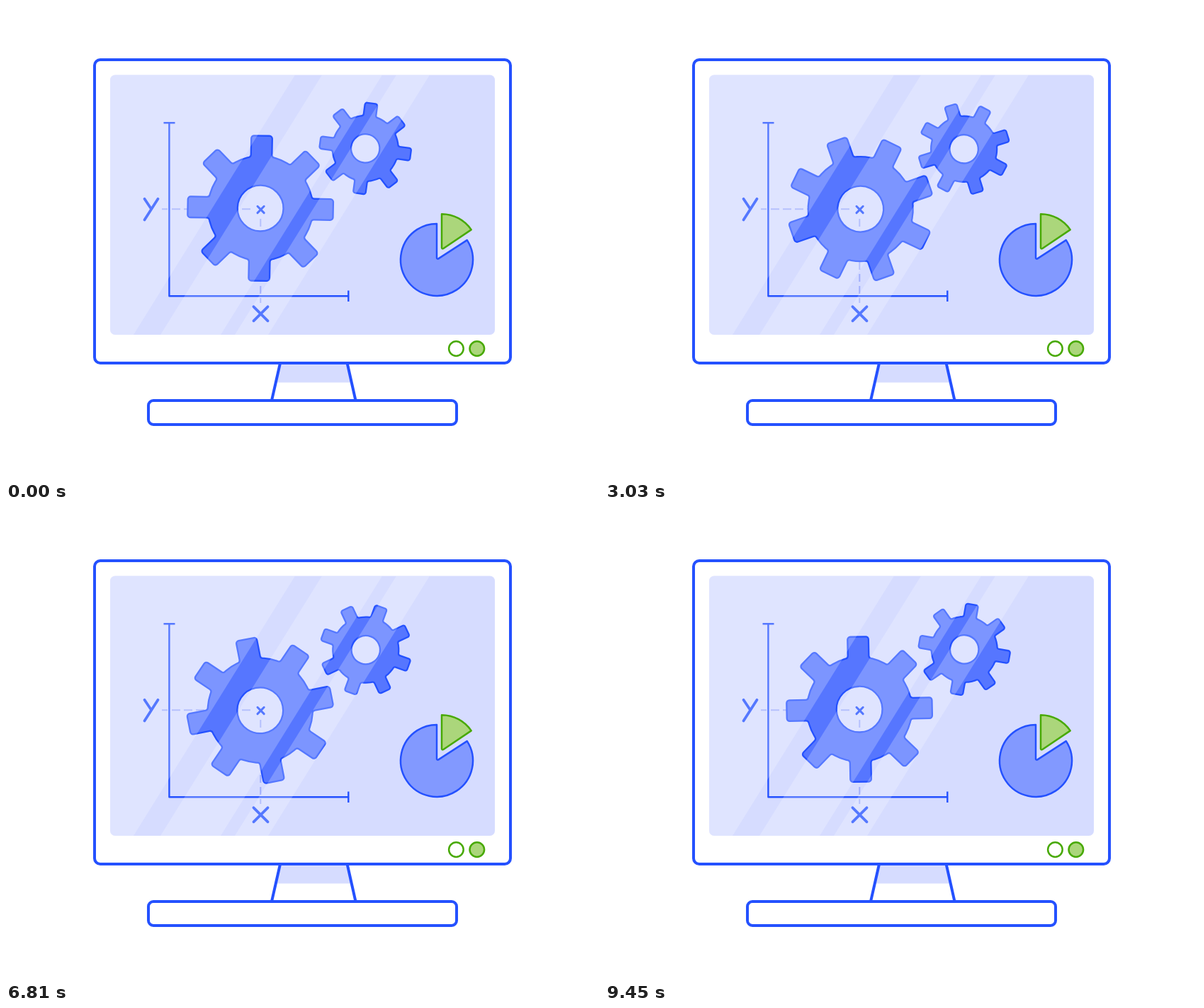
Recreate the animation shown at these times as an HTML page with a canvas. Size 837 px wide and 669 px high, loop 9.48 s.

```html
<!DOCTYPE html>
<html lang="en">
<head>
<meta charset="utf-8">
<title>Gears on a monitor</title>
<style>
html, body { margin: 0; width: 100%; height: 100%; overflow: hidden; background: #fff; }
canvas { display: block; width: 837px; height: 669px; }
</style>
</head>
<body>
<canvas id="stage"></canvas>
<script>
const W = 837, H = 669, LOOP = 9480, STEP = 30, TURN = 9510;
const BLUE = '#2451ff', GEAR = '#5676ff', PALE = '#d6dcff', GREEN = '#48a905', LIME = '#abd67b';
const RAD = Math.PI / 180;

const canvas = document.getElementById('stage');
const ctx = canvas.getContext('2d');
const dpr = window.devicePixelRatio || 1;
canvas.width = W * dpr;
canvas.height = H * dpr;

// dir: turning direction; the hub sits slightly off the pivot and orbits it
const gears = [
  { x: 359.6, y: 287.1, dir: 1, start: 1.1, off: 1.1, offAngle: -115,
    outer: 102.6, root: 74, half: 14.8, hole: 32.4, corner: 4 },
  { x: 507.2, y: 202, dir: -1, start: 7.6, off: 0.6, offAngle: -90,
    outer: 64.4, root: 46.5, half: 8.8, hole: 20.2, corner: 3 }
];

function paint(fill, stroke, width) {
  if (fill) { ctx.fillStyle = fill; ctx.fill('evenodd'); }
  if (stroke) { ctx.strokeStyle = stroke; ctx.lineWidth = width; ctx.stroke(); }
}

function box(x, y, w, h, r, fill, stroke, width) {
  ctx.beginPath();
  ctx.roundRect(x, y, w, h, r);
  paint(fill, stroke, width);
}

function disc(x, y, r, fill, stroke, width) {
  ctx.beginPath();
  ctx.arc(x, y, r, 0, 2 * Math.PI);
  paint(fill, stroke, width);
}

function lines(color, width, ...paths) {
  ctx.beginPath();
  for (const p of paths) {
    ctx.moveTo(p[0], p[1]);
    for (let i = 2; i < p.length; i += 2) ctx.lineTo(p[i], p[i + 1]);
  }
  paint(null, color, width);
}

function slice(x, y, r, from, to, fill, stroke) {
  ctx.beginPath();
  ctx.moveTo(x, y - r / 2);
  ctx.arcTo(x, y, x + r * Math.cos(33 * RAD), y - r * Math.sin(33 * RAD), 1.5);
  if (to > from) ctx.arc(x, y, r, to * RAD, from * RAD, true);
  else ctx.arc(x, y, r, from * RAD, (to + 360) * RAD);
  ctx.closePath();
  paint(fill, stroke, 2.5);
}

function drawGear(g, t) {
  const turn = g.dir * 360 * t / TURN;
  const orbit = (g.offAngle + turn) * RAD;
  const base = Math.asin(g.half / g.root);
  const gap = 5 / g.root;
  const rootY = -Math.cos(base) * g.root;
  ctx.save();
  ctx.translate(g.x + g.off * Math.cos(orbit), g.y + g.off * Math.sin(orbit));
  ctx.rotate((g.start + turn) * RAD);
  ctx.beginPath();
  for (let i = 0; i < 8; i++) {
    const a = i * Math.PI / 4, c = Math.cos(a), s = Math.sin(a);
    const at = (x, y) => [x * c - y * s, x * s + y * c];
    const onRoot = k => at(g.root * Math.sin(k), -g.root * Math.cos(k));
    const corners = [
      at(-g.half, rootY), at(-g.half, -g.outer),
      at(g.half, -g.outer), at(g.half, rootY), onRoot(base + gap)
    ];
    if (i === 0) ctx.moveTo(...onRoot(-base - gap));
    for (let k = 0; k < 4; k++) ctx.arcTo(...corners[k], ...corners[k + 1], g.corner);
    ctx.arc(0, 0, g.root, a - Math.PI / 2 + base + gap, a - Math.PI / 4 - base - gap);
  }
  ctx.closePath();
  ctx.moveTo(g.hole, 0);
  ctx.arc(0, 0, g.hole, 0, 2 * Math.PI);
  paint(GEAR, BLUE, 2.3);
  ctx.restore();
}

function drawDashes() {
  const color = '#a0aefc', y = 287.3, x = 359.3;
  lines(color, 2, [220, y, 228, y], [333, y, 345, y], [x, 301, x, 312], [x, 413, x, 420]);
  for (let i = 0; i < 4; i++) lines(color, 2, [234 + i * 17, y, 246 + i * 17, y]);
  for (let i = 0; i < 3; i++) lines(color, 2, [x, 362 + i * 17, x, 373 + i * 17]);
}

// Slanted light bands over the whole screen
function drawShine() {
  const lean = 228;
  ctx.fillStyle = 'rgba(255,255,255,0.225)';
  for (const [a, b] of [[100, 408], [446, 531], [551, 598]]) {
    ctx.beginPath();
    ctx.moveTo(a, 97.5);
    ctx.lineTo(b, 97.5);
    ctx.lineTo(b - lean, 465);
    ctx.lineTo(a - lean, 465);
    ctx.fill();
  }
}

function drawMonitor() {
  ctx.fillStyle = PALE;
  ctx.beginPath();
  ctx.moveTo(387, 506);
  ctx.lineTo(482, 506);
  ctx.lineTo(488, 532.5);
  ctx.lineTo(381, 532.5);
  ctx.fill();
  lines(BLUE, 4, [387, 505, 375, 558], [481.6, 505, 493.5, 558]);
  box(201, 558, 435, 34, 7, '#fff', BLUE, 4);
  box(125, 76, 587, 429, 8, '#fff', BLUE, 4);
  disc(635.4, 484.6, 10.3, '#fff', GREEN, 2.5);
  disc(664.8, 484.6, 10.3, LIME, GREEN, 2.5);
}

function drawScreen(t) {
  ctx.save();
  ctx.beginPath();
  ctx.roundRect(147, 97.5, 543, 367.5, 7);
  ctx.clip();
  ctx.fillStyle = PALE;
  ctx.fillRect(147, 97, 543, 369);

  drawDashes();
  gears.forEach(g => drawGear(g, t));
  lines(BLUE, 2.4, [222.5, 165.2, 238.5, 165.2], [230.4, 165.2, 230.4, 410.2, 483.3, 410.2],
    [483.3, 402.5, 483.3, 418]);

  ctx.lineCap = 'round';
  lines(BLUE, 3, [355, 283.3, 364.2, 292.6], [364.2, 283.3, 355, 292.6]);
  lines(BLUE, 3.8, [349.5, 425.3, 369.5, 445.3], [369.5, 425.3, 349.5, 445.3]);
  lines(BLUE, 3.8, [195.5, 272.8, 205, 287], [214.5, 272.8, 195.5, 302.5]);
  ctx.lineCap = 'butt';

  drawShine();
  slice(608, 358.9, 51, -33, -90, '#8299ff', BLUE);
  slice(615, 344.5, 50.3, -90, -34, LIME, GREEN);
  ctx.restore();
}

function frame(now) {
  const t = Math.floor((now % LOOP) / STEP) * STEP;
  ctx.setTransform(dpr, 0, 0, dpr, 0, 0);
  ctx.lineJoin = 'round';
  ctx.fillStyle = '#fff';
  ctx.fillRect(0, 0, W, H);
  drawMonitor();
  drawScreen(t);
}

const begin = performance.now();
function tick() {
  frame(performance.now() - begin);
  requestAnimationFrame(tick);
}
tick();
</script>
</body>
</html>
```
